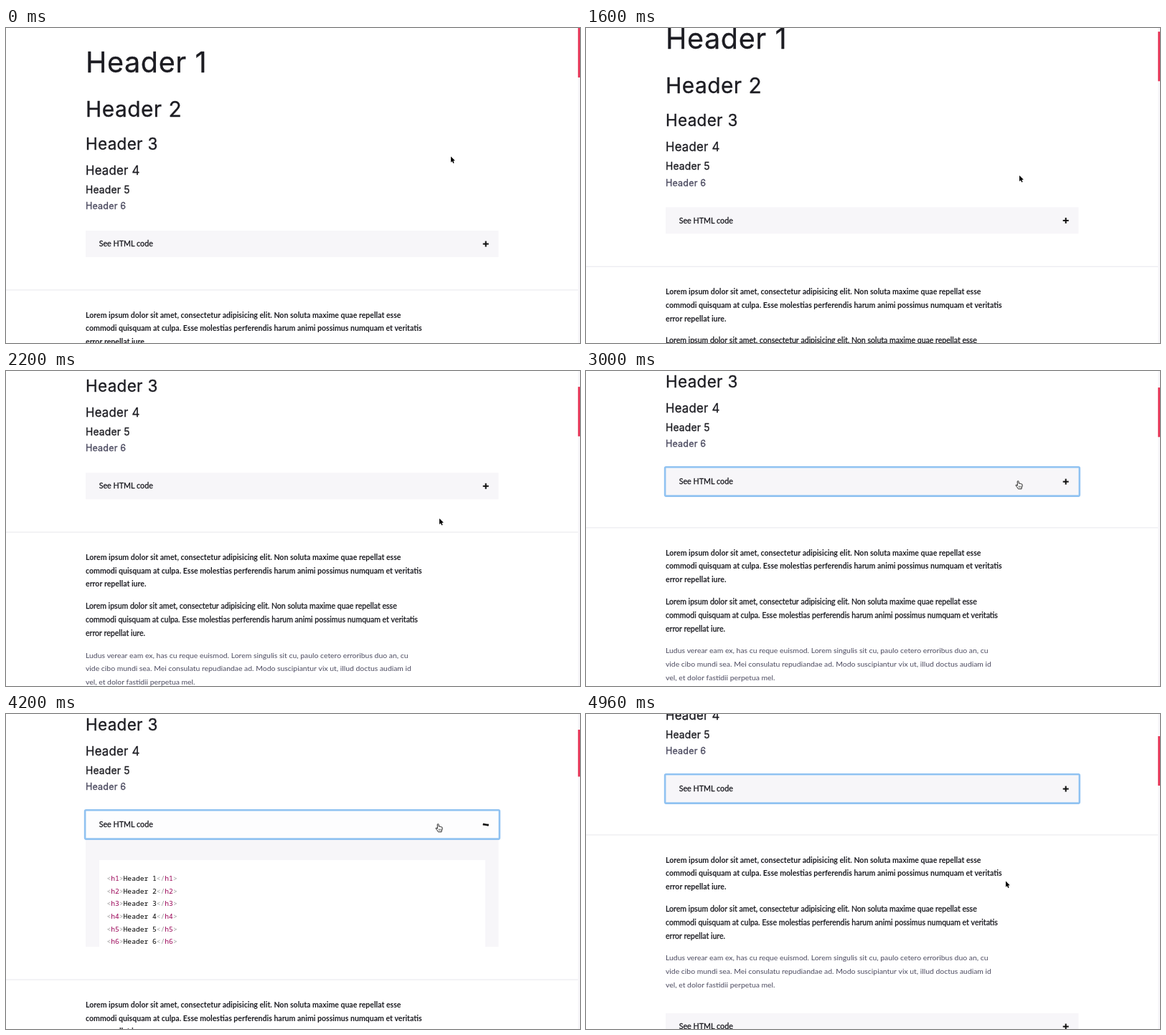
An HTML page with a canvas that plays this animation: 800 by 440 pixels, repeating every 5 s.

```html
<!DOCTYPE html>
<html lang="en">
<head>
<meta charset="utf-8">
<title>Typography page</title>
<style>
  html, body { margin: 0; width: 100%; height: 100%; overflow: hidden; background: #fff; }
  canvas { display: block; width: 800px; height: 440px; }
</style>
</head>
<body>
<canvas id="stage" width="800" height="440"></canvas>
<script>
const ctx = document.getElementById('stage').getContext('2d');
const LOOP = 5000, STEP = 40;
const VIEW = 440, PAGE = 2800, PANEL = 186;
const INK = '#1c1c22', SOFT = '#4c4b60', PALE = '#f7f6f9', ACCENT = '#e8385a', FOCUS = '#90c2f1';
const LEFT = 111, WIDTH = 575.5, BAR = 37;
const MEDIUM = 0.3; // outline width that thickens regular text

const HEADERS = [[39.5, 62], [29.9, 123.5], [22.4, 169.8], [16.7, 204.6], [13.8, 230.8], [12.5, 253.2]];
const INTRO = [
  'Lorem ipsum dolor sit amet, consectetur adipisicing elit. Non soluta maxime quae repellat esse',
  'commodi quisquam at culpa. Esse molestias perferendis harum animi possimus numquam et veritatis',
  'error repellat iure.'
];
const LUDUS = [
  'Ludus verear eam ex, has cu reque euismod. Lorem singulis sit cu, paulo cetero erroribus duo an, cu',
  'vide cibo mundi sea. Mei consulatu repudiandae ad. Modo suscipiantur vix ut, illud doctus audiam id',
  'vel, et dolor fastidii perpetua mel.'
];

const clamp = v => Math.max(0, Math.min(1, v));
const span = (t, from, to) => clamp((t - from) / (to - from));
const smooth = p => p * p * (3 - 2 * p);
const mix = (a, b, p) => a + (b - a) * p;

function text(str, x, y, font, { color = INK, spacing = 0, outline = 0 } = {}) {
  ctx.font = font;
  ctx.letterSpacing = spacing + 'px';
  ctx.fillStyle = color;
  ctx.fillText(str, x, y);
  if (outline) {
    ctx.strokeStyle = color;
    ctx.lineWidth = outline;
    ctx.strokeText(str, x, y);
  }
}

function box(x, y, w, h, color) {
  ctx.fillStyle = color;
  ctx.fillRect(x, y, w, h);
}

function shape(points) {
  ctx.beginPath();
  points.forEach(([x, y]) => ctx.lineTo(x, y));
  ctx.closePath();
}

function paragraph(lines, y, font, style) {
  lines.forEach((line, i) => text(line, LEFT, y + i * 18.75, font, style));
}

function icon(x, y, open) {
  for (const angle of [0, Math.PI / 2 * (1 - open)]) {
    ctx.save();
    ctx.translate(x, y);
    ctx.rotate(angle);
    box(-4, -1, 8, 2, '#111');
    ctx.restore();
  }
}

function accordion(y, open = 0, focused = false) {
  box(LEFT, y, WIDTH, BAR, PALE);
  ctx.globalAlpha = open;
  box(LEFT, y, WIDTH, BAR, '#fff');
  ctx.globalAlpha = 1;
  if (focused) {
    ctx.strokeStyle = FOCUS;
    ctx.lineWidth = 2.6;
    ctx.beginPath();
    ctx.roundRect(LEFT - 0.9, y - 1.8, WIDTH + 2.2, BAR + 3.4, 1.5);
    ctx.stroke();
  }
  text('See HTML code', 129.7, y + 22.2, '10.7px Lato, sans-serif', { outline: MEDIUM });
  icon(668.7, y + 18.6, open);
}

function codeLine(n, y) {
  const font = '9.65px "Noto Sans Mono", monospace';
  const parts = [['<', '#999'], ['h' + n, '#905'], ['>', '#999'], ['Header ' + n, '#000'],
                 ['</', '#999'], ['h' + n, '#905'], ['>', '#999']];
  let x = 140.5;
  for (const [str, color] of parts) {
    text(str, x, y, font, { color });
    x += ctx.measureText(str).width;
  }
}

function panel(y, height) {
  if (height <= 0) return;
  ctx.save();
  ctx.beginPath();
  ctx.rect(0, y + 1.5, 800, height - 1.5);
  ctx.clip();
  box(LEFT, y, WIDTH, PANEL, PALE);
  box(130, y + 31, 538, 133.5, '#fff');
  for (let n = 1; n <= 6; n++) codeLine(n, y + 60.3 + (n - 1) * 17.55);
  ctx.restore();
}

function page(open, focused) {
  HEADERS.forEach(([size, y], i) => {
    const color = i === 5 ? SOFT : INK;
    text('Header ' + (i + 1), LEFT, y, `${size}px Inter, sans-serif`,
      { color, spacing: size * 0.016, outline: MEDIUM });
  });
  const grown = open * PANEL;
  panel(283 + BAR, grown);
  accordion(283, open, focused);
  ctx.translate(0, grown);
  box(0, 365.3, 797, 1.2, '#ebebef');
  paragraph(INTRO, 404.7, 'bold 10.55px Lato, sans-serif');
  paragraph(INTRO, 473, '10.57px Lato, sans-serif', { outline: MEDIUM });
  paragraph(LUDUS, 541.3, '10.41px Lato, sans-serif', { color: SOFT });
  accordion(615);
}

function scrollbar(scroll, open) {
  const total = PAGE + open * PANEL;
  box(797, 0, 3, VIEW, PALE);
  box(797.2, scroll * VIEW / total, 2.8, VIEW * VIEW / total, ACCENT);
}

function arrow() {
  shape([[0, 0], [0, 8.2], [1.9, 6.5], [3.2, 9.5], [4.6, 8.9], [3.4, 6], [5.8, 5.8]]);
  ctx.strokeStyle = '#fff';
  ctx.lineWidth = 1.4;
  ctx.stroke();
  ctx.fillStyle = '#000';
  ctx.fill();
}

function hand() {
  shape([[-0.8, 0.6], [0.2, 0], [1.1, 0.7], [1.3, 3.6], [3, 3.6], [4.6, 4.2], [6, 4.8], [6.1, 7.6],
         [5.2, 9.4], [5, 11.2], [0.4, 11.2], [-1, 9], [-3, 6.4], [-2.4, 5.4], [-0.6, 6.6]]);
  ctx.fillStyle = '#fff';
  ctx.strokeStyle = '#111';
  ctx.lineWidth = 0.9;
  ctx.fill();
  ctx.stroke();
  ctx.beginPath();
  for (const x of [1.1, 2.7, 4.2]) {
    ctx.moveTo(x, 7);
    ctx.lineTo(x, 9.4);
  }
  ctx.lineWidth = 0.6;
  ctx.stroke();
}

function cursor(t, scroll) {
  const moves = [[840, 1080, 604, 206], [2400, 2840, 602, 153.5], [4480, 4720, 585, 233.5]];
  let x = 620, y = 179.5;
  for (const [from, to, nextX, nextY] of moves) {
    const p = smooth(span(t, from, to));
    x = mix(x, nextX, p);
    y = mix(y, nextY, p);
  }
  const barTop = 283 - scroll;
  const overBar = y > barTop && y < barTop + BAR;
  ctx.save();
  ctx.translate(x, y);
  ctx.lineJoin = 'round';
  overBar && t > 2400 ? hand() : arrow();
  ctx.restore();
}

function draw(t) {
  const scroll = 147 * smooth(span(t, 1280, 2330)) + 50 * span(t, 4760, 4960) ** 1.5;
  const open = span(t, 3020, 3240) - span(t, 4160, 4380);
  box(0, 0, 800, VIEW, '#fff');
  ctx.save();
  ctx.lineJoin = 'round';
  ctx.translate(0, -scroll);
  page(open, t >= 2960);
  ctx.restore();
  scrollbar(scroll, open);
  cursor(t, scroll);
}

const start = performance.now();
function tick() {
  const t = (performance.now() - start) % LOOP;
  draw(Math.floor(t / STEP) * STEP);
  requestAnimationFrame(tick);
}
tick();
</script>
</body>
</html>
```
